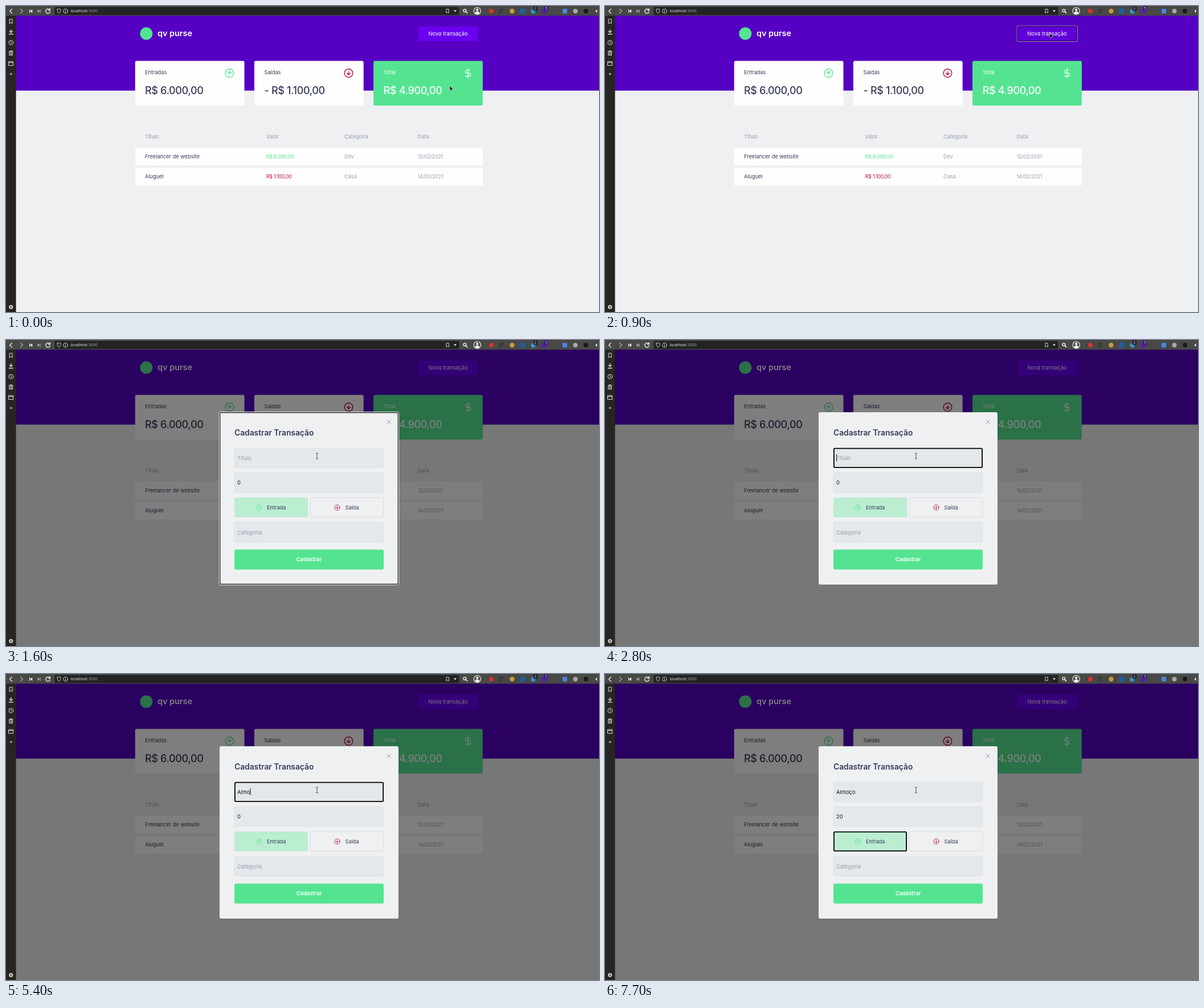
An HTML page for the animation above (8000 ms loop, 1041 px wide and 538 px high).

```html
<!DOCTYPE html>
<html lang="pt-BR">
<head>
<meta charset="utf-8">
<title>Controle de transações</title>
<style>
  html, body { margin: 0; width: 100%; height: 100%; overflow: hidden; background: #eff0f2; }
  svg { display: block; width: 100vw; height: 100vh; }
  text { font: 9.2px Inter, sans-serif; fill: #363b5a; }
  .muted { fill: #969cb3; }
  .white { fill: #fff; }
  .field { font-size: 9.4px; fill: #111; }
  .field.muted { fill: #969cb3; }
  .num { font-size: 8.8px; letter-spacing: -.02em; }
  .big { font-size: 18px; font-weight: 500; }
  .bold { font-weight: 600; }
  .bar { font: 7px "Open Sans", sans-serif; fill: #f4f4f4; }
  .line { fill: none; stroke: currentColor; stroke-linecap: round; stroke-linejoin: round; }
  .green { color: #54e491; fill: #54e491; }
  .red { color: #b80b46; fill: #b80b46; }
  .input { fill: #e4e8eb; stroke: #d3d7dc; stroke-width: .6; }
  .ring { fill: none; stroke: #000; stroke-width: 1.8; }
</style>
</head>
<body>
<svg viewBox="0 0 1041 538" preserveAspectRatio="none">
  <defs>
    <g id="up" class="line"><circle r="10"/><path d="M4 0 0-4-4 0M0 4V-4"/></g>
    <g id="down" class="line"><circle r="10"/><path d="M4 0 0 4-4 0M0-4V4"/></g>
    <path id="dollar" class="line" d="M0-11V11M5-7H-2.5a3.5 3.5 0 0 0 0 7h5a3.5 3.5 0 0 1 0 7H-6"/>
  </defs>

  <!-- page -->
  <path fill="#eff0f2" d="M0 0H1041V538H0z"/>
  <path fill="#5500c3" d="M17 17H1041V148.8H17z"/>
  <circle class="green" cx="246.3" cy="48.5" r="11"/>
  <text class="white bold" x="266" y="53" style="font-size:14.4px">qv purse</text>
  <rect id="newButton" x="723.9" y="35.9" width="104.8" height="26.1" rx="2.7" fill="#6900ef"/>
  <text class="white" x="776" y="52" text-anchor="middle" style="font-size:9.3px">Nova transação</text>
  <g id="buttonRing" fill="none">
    <rect x="723.2" y="35.1" width="106.2" height="27.4" rx="2.5" stroke="#fff" stroke-width=".7"/>
    <rect x="724" y="35.9" width="104.6" height="25.8" rx="2" stroke="#10001f"/>
  </g>

  <g fill="#fffefe">
    <rect x="226.7" y="96.4" width="191.8" height="78.5" rx="2.7"/>
    <rect x="435.9" y="96.4" width="191.8" height="78.5" rx="2.7"/>
    <rect class="green" x="645.1" y="96.4" width="191.8" height="78.5" rx="2.7"/>
    <rect x="226.7" y="249.2" width="610.2" height="31.2" rx="2.2"/>
    <rect x="226.7" y="284.5" width="610.2" height="31.2" rx="2.2"/>
  </g>
  <text x="244" y="119.5">Entradas</text>
  <text x="453.5" y="119.5">Saídas</text>
  <text class="white" x="662.7" y="119.5">Total</text>
  <text class="num big" x="244" y="155">R$ 6.000,00</text>
  <text class="num big" x="453.5" y="155">- R$ 1.100,00</text>
  <text class="num big white" x="662.7" y="155">R$ 4.900,00</text>
  <use href="#up" class="green" transform="translate(392.5 118) scale(.73)" stroke-width="1.9"/>
  <use href="#down" class="red" transform="translate(601.5 118) scale(.73)" stroke-width="1.9"/>
  <use href="#dollar" color="#fff" transform="translate(811 118.2) scale(.74)" stroke-width="1.6"/>

  <g id="table"></g>
  <path id="overlay" fill="#000" fill-opacity=".5" d="M17 17H1041V538H17z"/>

  <!-- dialog -->
  <g id="modal">
    <rect x="375" y="127" width="314" height="303" rx="2.7" fill="#eff0f2"/>
    <g id="modalRing" fill="none">
      <rect x="374.5" y="126.5" width="315" height="304" rx="2.5" stroke="#fff"/>
      <rect x="375.6" y="127.6" width="312.8" height="301.8" rx="2" stroke="#000" stroke-width="1.2"/>
    </g>
    <path id="close" class="line" color="#969cb3" d="M668.6 140.6l6.8 6.8m0-6.8l-6.8 6.8"/>
    <text class="bold" x="401" y="167.6" style="font-size:13.8px">Cadastrar Transação</text>
    <rect class="input" x="401.3" y="190" width="261.4" height="34.6" rx="3"/>
    <rect class="input" x="401.3" y="233.5" width="261.4" height="34.6" rx="3"/>
    <rect class="input" x="401.3" y="320.6" width="261.4" height="34.6" rx="3"/>
    <rect x="401.3" y="277.2" width="128.4" height="34.4" rx="2.2" fill="#bbeed1" stroke="#c6dfd2" stroke-width=".6"/>
    <rect x="534.3" y="277.2" width="128.4" height="34.4" rx="2.2" fill="#eff0f2" stroke="#d3d7dc" stroke-width=".8"/>
    <use href="#up" class="green" transform="translate(444.2 294.5) scale(.46)" stroke-width="2"/>
    <use href="#down" class="red" transform="translate(581.5 294.5) scale(.46)" stroke-width="2"/>
    <text x="458" y="297.9">Entrada</text>
    <text x="595.6" y="297.9">Saída</text>
    <text class="field muted" x="406" y="341.5">Categoria</text>
    <rect class="green" x="401" y="368.5" width="262" height="35" rx="2.7"/>
    <text class="white bold" x="532" y="389.3" text-anchor="middle" style="font-size:9.4px">Cadastrar</text>

    <text id="placeholder" class="field muted" x="406" y="210.6">Título</text>
    <text id="title" class="field" x="406" y="210.6"></text>
    <path id="selection" fill="#3f70d6" d="M406 244.5h5.6v13h-5.6z"/>
    <text id="value" class="field" x="406" y="254.4"></text>
    <g id="spinner">
      <rect x="649" y="244" width="9.5" height="14" rx="1" fill="#f4f5f6"/>
      <path fill="#222" d="M651.6 249.2l2.2-2.6 2.2 2.6zM651.6 253l2.2 2.6 2.2-2.6z"/>
    </g>
    <rect id="focus" class="ring" x="401.9" width="260.2" height="33.4" rx="1.6"/>
    <rect id="caret" width=".9" height="12.6" fill="#000"/>
  </g>

  <!-- browser -->
  <path fill="#484846" d="M0 0H1041V17H0z"/>
  <path fill="#272522" d="M0 17H17.6V538H0z"/>
  <rect x="85.5" y="1.8" width="710" height="14" rx="1.5" fill="#232323"/>
  <text class="bar" x="113.5" y="11.4">localhost<tspan fill="#a5a5a5">:3000</tspan></text>
  <g class="line" color="#f2f2f2" stroke-width="1.2">
    <path d="M10.5 5.2L6.6 9l3.9 3.8"/>
    <path d="M25.5 5.2L29.4 9l-3.9 3.8" color="#aaa"/>
    <path d="M76.6 6.8a3.8 3.8 0 1 0 .6 3.4M77.4 4.6v3h-3" stroke-width="1.4"/>
    <g stroke-width=".8">
      <path d="M90 5.8l3-1 3 1c0 4-1 6-3 7.2-2-1.2-3-3.2-3-7.2z"/>
      <circle cx="104.5" cy="9" r="3.8"/><path d="M104.5 8.6v2.4m0-4v.1"/>
      <path d="M773.3 5.5h4v6.8l-2-1.7-2 1.7z"/>
      <path d="M841 4v10" color="#5d5c59"/>
    </g>
    <circle cx="805.4" cy="8" r="2.4" stroke-width="1.4"/><path d="M807.4 10l2.2 2.4" stroke-width="1.6"/>
    <circle cx="827.3" cy="8.7" r="6.2"/>
  </g>
  <g fill="#f2f2f2">
    <path d="M41 6h1.3v6H41zM46.2 6v6l-3.8-3z"/>
    <path fill="#aaa" d="M55.5 6v6l3.8-3zM59.4 6h1.2v6h-1.2z"/>
    <path d="M786 7.6h5l-2.5 3zM1037.5 6v6l-3-3z"/>
    <circle cx="827.3" cy="6.8" r="2.2"/><path d="M823.4 12.6c0-4 7.8-4 7.8 0-2 2-5.8 2-7.8 0z"/>
    <circle cx="852" cy="9" r="4.2" fill="#d8342f"/>
    <circle cx="888.5" cy="9" r="4.2" fill="#c99b3e"/>
    <rect x="902.5" y="4.6" width="9" height="9" fill="#205f9f"/>
    <circle cx="925.5" cy="9.5" r="4" fill="#3597ce"/>
    <rect x="940" y="5.5" width="8.5" height="8.5" fill="#5521a5"/>
    <rect x="977" y="5" width="8" height="8" fill="#4b87df"/>
    <circle cx="999.5" cy="9" r="4" fill="#a9a9a7"/>
    <circle cx="1018" cy="9" r="4" fill="#191919"/>
    <rect x="926" y="1" width="7" height="7.5" rx="1" fill="#12122c"/>
    <rect x="944.5" y="1" width="7" height="7.5" rx="1" fill="#351083"/>
  </g>
  <text class="bar" x="866" y="12" style="font-style:italic;font-size:9px;fill:#191919">f?</text>
  <text class="bar bold" x="927.6" y="7.2" style="font-size:6.5px">0</text>
  <text class="bar bold" x="946.2" y="7.2" style="font-size:6.5px">5</text>
  <text class="bar" x="960" y="11.5" style="fill:#777">...</text>

  <g class="line" color="#dededb">
    <path d="M6.5 23.2h4.6v7.8l-2.3-2-2.3 2z"/>
    <path d="M8.8 41.5v5m-2.6-2.3l2.6 2.6 2.6-2.6M5.3 49.5h7" stroke-width="1.3"/>
    <circle cx="8.8" cy="64.3" r="3.9"/><path d="M8.8 62v2.5l1.6 1"/>
    <path d="M6.2 80h5.2v6.5H6.2zM5.6 80h6.4M7.6 78.8h2.4M7.5 82.5h2.6m-2.6 2h2.6"/>
    <path d="M5 97.7h7.6v6.8H5zM5 99.5h7.6"/>
    <path d="M6.7 119.5h4.2m-2.1-2.1v4.2" stroke-width=".8"/>
    <circle cx="8.8" cy="529.3" r="2.2" stroke-width="1.6"/>
    <circle cx="8.8" cy="529.3" r="3.4" stroke-width="1.1" stroke-dasharray=".7 1.97"/>
  </g>

  <!-- pointer shapes, with the hot spot at 0,0 -->
  <g id="pointer">
    <path id="arrow" fill="#111" stroke="#e8e8e8" stroke-width=".7" d="M0 0v9.2l2.1-1.9 1.5 3.2 1.3-.6-1.4-3.1h2.8z"/>
    <path id="hand" fill="#111" stroke="#e8e8e8" stroke-width=".6" d="M-.6 0q.8-.7 1.4 0v3l3.2.6q.8.3.7 1.2L4 8.4H.2L-2 5.2q.2-.9 1.4 0z"/>
    <path id="beam" class="line" color="#4c4e51" stroke-width="1" d="M-1.8 0Q0 0 0 1Q0 0 1.8 0M0 1V9M-1.8 10Q0 10 0 9Q0 10 1.8 10"/>
  </g>
</svg>
<script>
const $ = id => document.getElementById(id);
const show = (id, on) => $(id).style.display = on ? '' : 'none';
const attr = (id, values) => {
  for (const key in values) $(id).setAttribute(key, values[key]);
};

// Table
const columns = [244, 456.7, 594, 722.7];
const rows = [
  [232.5, ['Título', 'Valor', 'Categoria', 'Data'], ['muted', 'muted', 'muted', 'muted']],
  [268, ['Freelancer de website', 'R$ 6.000,00', 'Dev', '12/02/2021'], ['', 'num green', 'muted', 'num muted']],
  [303.3, ['Aluguel', 'R$ 1.100,00', 'Casa', '14/02/2021'], ['', 'num red', 'muted', 'num muted']]
];
$('table').innerHTML = rows.map(([y, words, styles]) => words.map((word, i) =>
  `<text class="${styles[i]}" x="${columns[i]}" y="${y}">${word}</text>`).join('')).join('');

// Each list holds [start time, state]
const titleSteps = [[0, ''], [4400, 'Al'], [4600, 'Alm'], [4800, 'Almo'], [5000, 'Almoc'],
  [5400, 'Almo'], [5600, 'Almo´'], [5700, 'Almoç'], [5900, 'Almoço']];
const valueSteps = [[0, '0'], [7300, '2'], [7400, '20']];
const focusSteps = [[0, 'none'], [900, 'button'], [1000, 'modal'], [2800, 'title'],
  [6500, 'value'], [7700, 'type']];
const caretSteps = [[0, false], [2800, true], [3200, false], [3400, true], [4000, false],
  [4400, true], [6500, false], [7300, true], [7700, false]];
const at = (steps, t) => steps.findLast(step => step[0] <= t)[1];

const glide = (t, start, end, from, to) => {
  const p = Math.min(1, Math.max(0, (t - start) / (end - start)));
  const eased = p * p * (3 - 2 * p);
  return from.map((v, i) => v + (to[i] - v) * eased);
};

function draw(time) {
  const t = Math.floor(time / 100) * 100;
  const open = t >= 1000;
  const focus = at(focusSteps, t);

  const [x, y] = open ? glide(t, 1000, 1600, [783, 74], [546, 199])
                      : glide(t, 300, 800, [779, 140], [781, 47]);
  const hover = !open && y < 62;
  const overField = open && y > 189;
  attr('pointer', { transform: `translate(${x} ${y})` });
  show('arrow', !hover && !overField);
  show('hand', hover);
  show('beam', overField);

  attr('newButton', { fill: hover ? '#5f00d7' : '#6900ef' });
  show('buttonRing', focus === 'button');
  show('overlay', open);
  show('modal', open);
  show('modalRing', focus === 'modal');
  show('close', t >= 1100);

  const title = at(titleSteps, t);
  const selected = focus === 'value' && t < 7300;
  $('title').textContent = title;
  $('value').textContent = at(valueSteps, t);
  $('value').style.fill = selected ? '#b9d0ff' : '';
  show('placeholder', !title);
  show('selection', selected);
  show('spinner', focus === 'value');

  const ringTop = { title: 190.7, value: 234.2, type: 277.7 }[focus];
  show('focus', ringTop);
  if (ringTop) attr('focus', { y: ringTop, width: focus === 'type' ? 127.2 : 260.2 });

  const caretOn = at(caretSteps, t);
  show('caret', caretOn);
  if (caretOn) {
    const width = focus === 'title' && !title ? 0 : $(focus).getComputedTextLength();
    attr('caret', { x: 406 + width, y: focus === 'title' ? 201 : 244.6 });
  }
}

function frame(now) {
  draw(now % 8000);
  requestAnimationFrame(frame);
}
draw(0);
requestAnimationFrame(frame);
</script>
</body>
</html>
```
